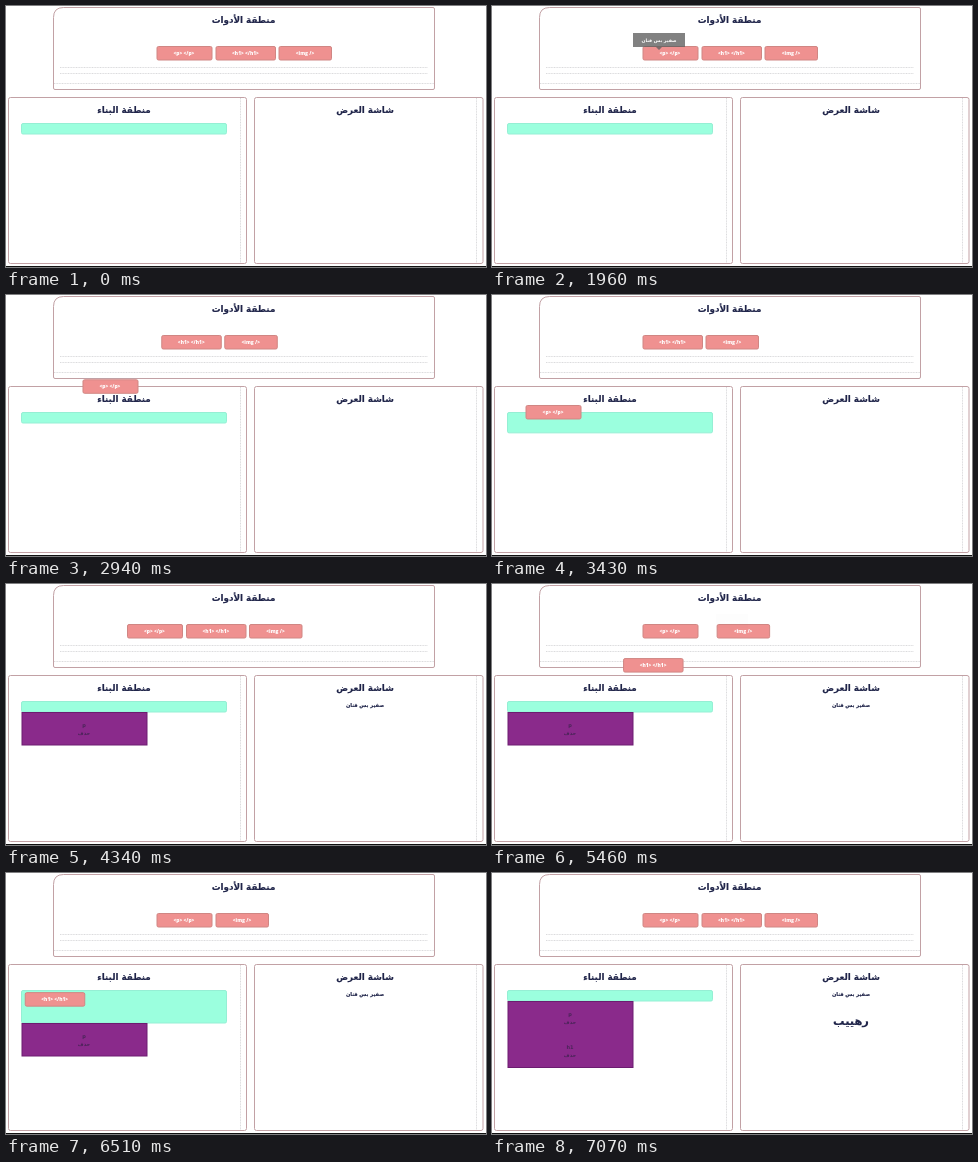
These frames come from a looping animation (480x261 px, 8 s). An HTML page:

```html
<!DOCTYPE html>
<html lang="ar">
<head>
<meta charset="utf-8">
<style>
  html, body { margin: 0; width: 100%; height: 100%; overflow: hidden; background: #fff; }
  svg { display: block; width: 100vw; height: 100vh; }
  text { text-anchor: middle; font-family: "DejaVu Sans", sans-serif; font-weight: bold; }
  .ar { direction: rtl; fill: #20254a; stroke: #20254a; stroke-width: .15; font-size: 8.8px; }
  .panel { fill: none; stroke: #c2a1a5; }
  .rule { fill: none; stroke: #d2d2d5; stroke-dasharray: 1 .6; stroke-width: .8; }
  .btn rect { fill: #ef9190; stroke: #d08683; }
  .btn text { fill: #fff; font-family: "Open Sans", sans-serif; font-weight: 800; font-size: 4.9px; }
  .tip path { fill: #616161; }
  .tip text { fill: #fff; font-size: 4.7px; direction: rtl; }
  .block rect { fill: #8a2a8b; stroke: #6c1c70; }
  .block text { fill: #4b2459; font-size: 5px; }
</style>
</head>
<body>
<svg viewBox="0 0 480 261" preserveAspectRatio="none">
  <rect width="480" height="261" fill="#fff"/>
  <path class="panel" d="M57.5 1.5H427q1.5 0 1.5 1.5V82q0 1.5-1.5 1.5H49q-1.5 0-1.5-1.5V11.5q0-10 10-10z"/>
  <path class="rule" d="M54 61.5H422M54 67.5H422M48 77.5H428M234.5 92V257M470.5 92V257"/>
  <rect class="panel" x="2.5" y="91.5" width="238" height="166" rx="2"/>
  <rect class="panel" x="248.5" y="91.5" width="228.5" height="166" rx="2"/>
  <rect y="260" width="480" height="1" fill="#111"/>

  <text class="ar" x="237.5" y="17">منطقة الأدوات</text>
  <text class="ar" x="118" y="107">منطقة البناء</text>
  <text class="ar" x="359" y="107">شاشة العرض</text>
  <text class="ar" id="outP" x="359" y="123" style="font-size:5.1px">صفير بس فنان</text>
  <text class="ar" id="outH" x="359" y="152" style="font-size:11.4px">رهييب</text>

  <rect id="slot" x="15.5" y="117.5" width="205" rx="1.5" fill="#9bffde" stroke="#95efd4"/>
  <g class="block" id="block">
    <rect id="blockBox" x="16" y=".5" width="125"/>
    <text x="78" y="14.5">p</text>
    <text x="78" y="22.5">حذف</text>
    <g id="blockH">
      <text x="78" y="47.5">h1</text>
      <text x="78" y="55.5">حذف</text>
    </g>
  </g>

  <g class="btn" id="img"><rect y=".5" width="52.5" height="13.5" rx="1.5"/><text x="26" y="9">&lt;img /&gt;</text></g>
  <g class="btn" id="h1"><rect y=".5" width="59.5" height="13.5" rx="1.5"/><text x="29.500" y="9">&lt;h1&gt; &lt;/h1&gt;</text></g>
  <g class="btn" id="p"><rect y=".5" width="55" height="13.5" rx="1.5"/><text x="27" y="9">&lt;p&gt; &lt;/p&gt;</text></g>

  <g class="tip" id="tipP"><path d="M141 27h52v14h-23l-3 3l-3-3h-23z"/><text x="167" y="35.800">صفير بس فنان</text></g>
  <g class="tip" id="tipH"><path d="M224 30h32v14h-13l-3 3l-3-3h-13z"/><text x="240" y="38.500">رهييب</text></g>
</svg>
<script>
const LOOP = 8000, STEP = 70;
const ROW_Y = 40, SLOT = { x: 16, y: 120, grow: 22 };
const $ = id => document.getElementById(id);
const mix = (a, b, k) => a + (b - a) * k;

// size is the button width plus the space after it
const tools = [
  { id: "p", x: 151, size: 59 },
  { id: "h1", x: 210, size: 63 },
  { id: "img", x: 273, size: 56 }
];
const drags = [
  { tool: 0, start: 2730, done: 4340, x: 34, y: 110 },
  { tool: 1, start: 5320, done: 6860, x: 42, y: 113 }
];
const tips = [
  { id: "tipP", from: 1890, to: 2170 },
  { id: "tipH", from: 4830, to: 5110 }
];

// Cubic ease-out from 0 to 1
function glide(t, start, time) {
  const k = Math.min(1, Math.max(0, (t - start) / time));
  return 1 - (1 - k) ** 3;
}

function place(index, t) {
  let x = tools[index].x, y = ROW_Y;
  for (const d of drags) {
    const room = tools[d.tool].size;
    if (t >= d.done) {
      x -= room / 2 * (1 - glide(t, d.done, 175));
    } else if (index === d.tool) {
      const carry = glide(t, d.start, 740);
      const drop = glide(t, d.done - 490, 280);
      x = mix(mix(x, d.x, carry), SLOT.x, drop);
      y = mix(mix(y, d.y, carry), SLOT.y, drop);
    } else if (index > d.tool) {
      x -= room * glide(t, d.start, 370);
    }
  }
  return [x, y];
}

const show = (id, on) => $(id).setAttribute("visibility", on ? "visible" : "hidden");

function draw(t) {
  tools.forEach((tool, i) => $(tool.id).setAttribute("transform", `translate(${place(i, t)})`));
  for (const { id, from, to } of tips) {
    $(id).setAttribute("opacity", glide(t, from, 170) * (1 - glide(t, to, 420)));
  }

  const active = drags.find(d => t >= d.start && t < d.done);
  const extra = active ? SLOT.grow * glide(t, active.start + 630, 390) : 0;
  const [hasP, hasH] = drags.map(d => t >= d.done);
  $("slot").setAttribute("height", 10.5 + extra);
  $("block").setAttribute("transform", `translate(0 ${128 + extra})`);
  $("blockBox").setAttribute("height", hasH ? 66 : 32.5);
  show("block", hasP);
  show("outP", hasP);
  show("blockH", hasH);
  show("outH", hasH);
}

const start = performance.now();
function tick() {
  const t = (performance.now() - start) % LOOP;
  draw(Math.floor(t / STEP) * STEP);
  requestAnimationFrame(tick);
}
draw(0);
requestAnimationFrame(tick);
</script>
</body>
</html>
```
